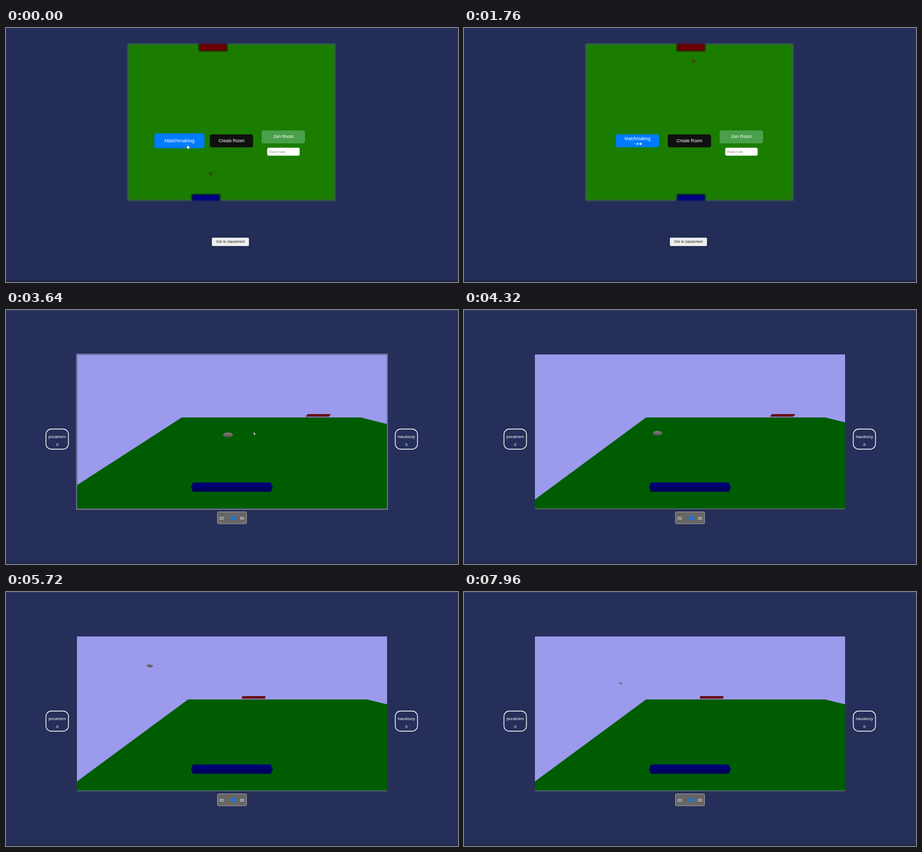
An HTML page for the animation above (8 s loop, 854 by 480 pixels).

```html
<!DOCTYPE html>
<html lang="fr">
<head>
<meta charset="utf-8">
<title>Paddle game</title>
<style>
html, body { margin: 0; width: 100%; height: 100%; overflow: hidden; background: #232d57; }
svg { display: block; width: 100vw; height: 100vh; }
text { font-family: "Liberation Sans", Arial, sans-serif; text-anchor: middle; fill: #fff; }
.button { font-size: 8.2px; }
.name { font-size: 7.6px; }
.mode { font-size: 7px; }
</style>
</head>
<body>
<svg viewBox="0 0 854 480">
  <defs>
    <filter id="blur" filterUnits="userSpaceOnUse" x="220" y="20" width="412" height="316" color-interpolation-filters="sRGB">
      <feGaussianBlur stdDeviation="1.5"/>
    </filter>
    <clipPath id="court"><rect x="230" y="30" width="392" height="296"/></clipPath>
    <clipPath id="view"><rect x="134" y="84" width="586" height="292"/></clipPath>
    <linearGradient id="shade" x2="0" y2="1">
      <stop offset="0" stop-color="#838383"/>
      <stop offset="1" stop-color="#505050"/>
    </linearGradient>
  </defs>

  <g id="menu">
    <rect width="854" height="480" fill="#232d57"/>
    <rect y="477" width="854" height="3" fill="#1c2444"/>
    <g filter="url(#blur)">
      <g clip-path="url(#court)">
        <rect x="230.5" y="30.5" width="391" height="295" fill="#1a7d00" stroke="#60757a"/>
        <rect id="redFlat" x="-26" y="26" width="52" height="17" fill="#6c0000" stroke="#300800" stroke-width="2"/>
        <rect id="blueFlat" x="-26" y="315" width="52" height="16" fill="#000086" stroke="#000c38" stroke-width="2"/>
      </g>
    </g>
    <g id="ballFlat">
      <circle r="3.2" fill="#25300b"/>
      <path d="M-2-2 2 2M2-2-2 2" stroke="#93502f" stroke-width="1.1"/>
    </g>
    <g id="match">
      <rect x="-40.8" y="-12" width="81.6" height="24.2" rx="4" fill="#007bff"/>
      <text id="matchText" class="button">Matchmaking</text>
      <g id="dots" fill="#fff">
        <circle cx="-5.7" cy="6" r="2.1"/><circle cx="0" cy="6" r="2.1"/><circle cx="5.8" cy="6" r="2.1"/>
      </g>
    </g>
    <rect x="385" y="201" width="81.8" height="24.5" rx="4" fill="#0f1110"/>
    <text class="button" x="426" y="216">Create Room</text>
    <rect x="483" y="193.5" width="82" height="24.5" rx="4" fill="#4aa04a"/>
    <text class="button" x="524" y="208.3">Join Room</text>
    <rect x="493.5" y="226.3" width="61.3" height="14.9" rx="3" fill="#fff"/>
    <text x="512.5" y="235.7" style="font-size:5.4px;fill:#777">Room Code</text>
    <rect x="389" y="396.3" width="70" height="15.7" rx="2" fill="#efefef"/>
    <text x="424" y="406.3" style="font-size:6.7px;fill:#222">Voir le classement</text>
    <path id="hand" d="M-1.8-4.5Q-1-5.3-.3-4.5V-1.5L2.8-.7Q3.5 2.5 1.9 4.5H-1.2L-3.6.8-2.6 0-1.8 1Z" fill="#fff" stroke="#333" stroke-width=".6"/>
  </g>

  <g id="game">
    <rect width="854" height="480" fill="#262f59"/>
    <path d="M0 .5H854" stroke="#3c4569"/>
    <rect y="477" width="854" height="3" fill="#1e2647"/>
    <g clip-path="url(#view)">
      <rect x="134" y="84" width="586" height="292" fill="#9b9aec"/>
      <polygon id="ground" fill="#005c00"/>
      <polygon id="redFar" fill="#680008"/>
      <path d="M353.5 326H500L504 335 500.5 343.5H353L349.5 335Z" fill="#00005e"/>
      <path d="M353.5 326H500L504 335H349.5Z" fill="#000074"/>
      <ellipse id="ballFar" fill="url(#shade)"/>
    </g>
    <path d="M134 375.8H720" stroke="#7c8a9e"/>
    <g id="focus" fill="none">
      <rect x="134" y="84" width="586" height="292" stroke="#33395c"/>
      <rect x="133.2" y="83.2" width="587.5" height="293.6" stroke="#a2a5b8"/>
    </g>
    <g fill="none" stroke="#fff" stroke-width="1.4">
      <rect x="75.5" y="225" width="42.5" height="38" rx="10"/>
      <rect x="735.5" y="225" width="42" height="38" rx="10"/>
    </g>
    <text class="name" x="96.8" y="242">pocalnem</text>
    <text class="name" x="96.8" y="256.5">0</text>
    <text class="name" x="756.5" y="242">haudoszy</text>
    <text class="name" x="756.5" y="256.5">0</text>
    <rect x="399.5" y="381.5" width="55" height="22.5" rx="2" fill="#666" stroke="#a5a5a5"/>
    <text class="mode" x="407.5" y="395.5">2D</text>
    <text class="mode" x="446" y="395.5">3D</text>
    <rect x="422.5" y="390.7" width="12" height="4.8" rx="2.4" fill="#466f98"/>
    <circle cx="430" cy="393" r="4" fill="#1976d2"/>
    <path id="arrow" d="M468 230.5V236.3L469.3 235.1 470.2 237 471 236.6 470.2 234.9H471.6Z" fill="#fff" stroke="#333" stroke-width=".3"/>
  </g>
</svg>
<script>
// Times are in seconds.
const LOOP = 8, GAME_START = 2.9, FOCUS_END = 4.3;
const HIT = 1.65;               // flat ball meets the red paddle
const KICK = 5, FLIGHT = 1.85;  // ball leaves the ground, time in the air
const VANISH_X = 427, VANISH_Y = 141.7, FAR_Y = 203, NEAR_Y = 376;
const EYE = FAR_Y - VANISH_Y, HALF_WIDTH = 169;

const $ = id => document.getElementById(id);
const show = (id, on) => { $(id).style.display = on ? '' : 'none'; };
const set = (id, attrs) => { for (const k in attrs) $(id).setAttribute(k, attrs[k]); };
const move = (id, x, y, more = '') => set(id, { transform: `translate(${x} ${y}) ${more}` });
const points = list => ({ points: list.join(' ') });
const ramp = (t, from, to) => Math.min(1, Math.max(0, (t - from) / (to - from)));

function drawMenu(t) {
  const sinceHit = t - HIT;
  const x = 428 + sinceHit * (sinceHit < 0 ? 25 : 48.3);
  const y = 47 + Math.abs(sinceHit) * 138.2;
  move('ballFlat', x, y);
  // Both paddles trail the ball.
  move('redFlat', x + 4.3 - 5 * Math.min(t, 1.76), 0);
  move('blueFlat', x - 9 + 1.5 * t * t, 0);

  const leave = ramp(t, 0.15, 0.7), waiting = t >= 0.16;
  move('hand', 344 - 225 * leave, 224 + 26 * leave);
  show('hand', t < 0.78);
  move('match', 327.7, 213, `scale(${1.16 - 0.16 * ramp(t, 0.2, 0.36)})`);
  set('matchText', { y: waiting ? -0.6 : 2.8 });
  show('dots', waiting);
  [...$('dots').children].forEach((dot, i) => {
    const phase = (t / 0.8 + 0.2 + (2 - i) * 0.115) % 1;
    const s = Math.max(0, 1 - Math.abs(phase - 0.4) / 0.4);
    dot.setAttribute('r', 2.1 * s * s * (3 - 2 * s));
  });
}

// Ball relative to the camera; depth 1 is the far edge of the ground.
function ballInSpace(t, camera) {
  const air = t - KICK;
  if (air < 0) return { side: camera - 79 - 71 * (t - 3.64), depth: 0.695 + 0.033 * air, lift: 0 };
  const u = Math.min(1, air / FLIGHT);
  return {
    side: -90 - 104.5 * air + 15.7 * air * air,
    depth: 0.695 + 0.44 * air,
    lift: 67 * 4 * u * (1 - u)
  };
}

function drawGame(t) {
  const camera = 86 * ramp(t, 3.024, 3.74), middle = VANISH_X + camera;
  const left = middle - HALF_WIDTH, right = middle + HALF_WIDTH;
  const project = x => VANISH_X + (x - VANISH_X) * (NEAR_Y - VANISH_Y) / EYE;
  set('ground', points([left, FAR_Y, right, FAR_Y, project(right), NEAR_Y, project(left), NEAR_Y]));

  const red = middle + 89 * ramp(t, 3.05, 3.55) - 134 * ramp(t, 4.85, 5.6);
  const skew = (red - VANISH_X) / 85, top = 196.8, bottom = 201.5;
  set('redFar', points([red - 22 + skew, top, red + 22 + skew, top, red + 22 - skew, bottom, red - 22 - skew, bottom]));

  const { side, depth, lift } = ballInSpace(t, camera);
  set('ballFar', { rx: 6 / depth, ry: 2.9 / depth });
  move('ballFar', VANISH_X + side / depth, VANISH_Y + (EYE - lift) / depth, `rotate(${lift / 8})`);
  show('focus', t < FOCUS_END);
  show('arrow', t < FOCUS_END);
}

const start = performance.now();
function frame(now) {
  const t = Math.max(0, now - start) / 1000 % LOOP, playing = t >= GAME_START;
  show('menu', !playing);
  show('game', playing);
  (playing ? drawGame : drawMenu)(t);
  requestAnimationFrame(frame);
}
frame(start);
</script>
</body>
</html>
```
